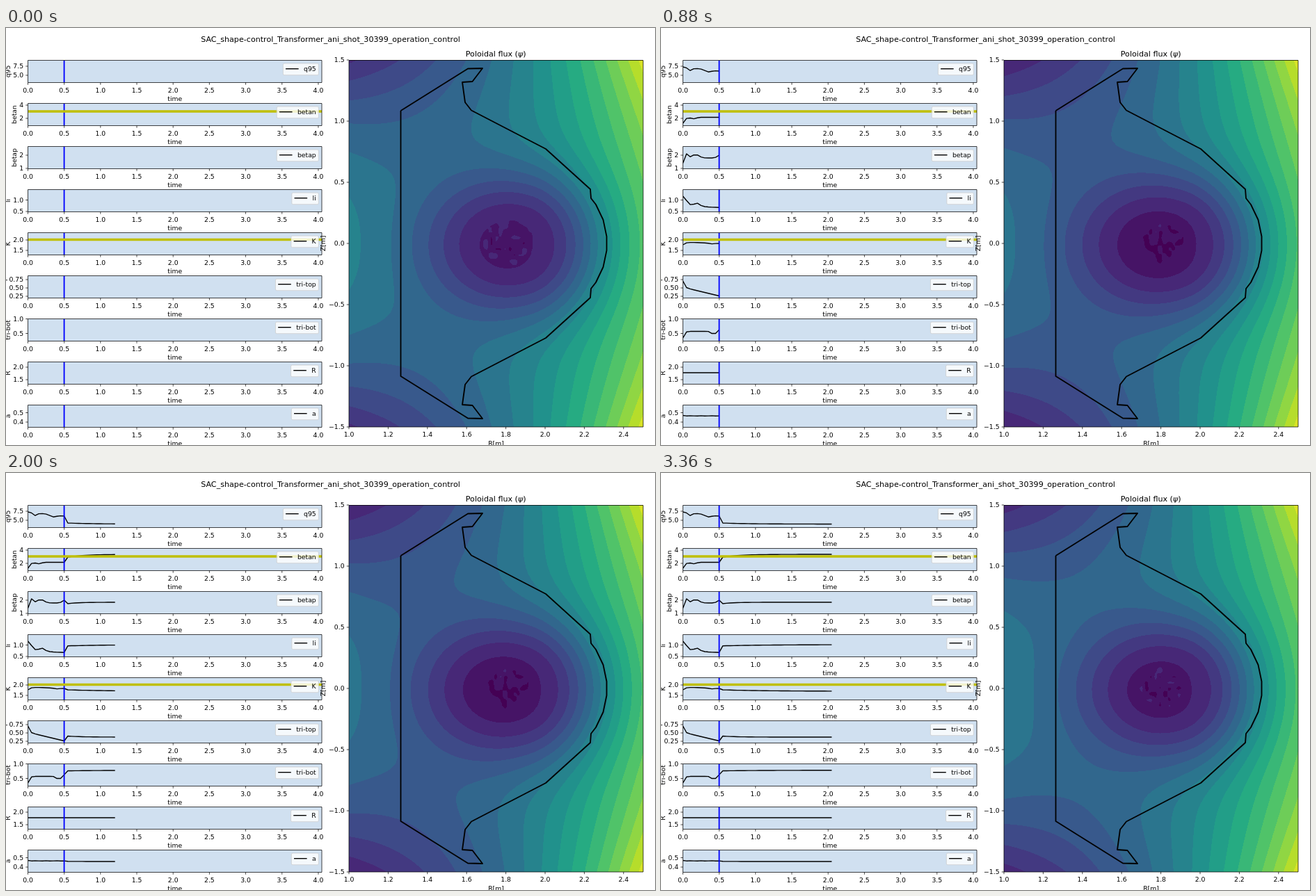
These frames come from a looping animation (933x600 px, 3.44 s). An HTML page with a canvas:

```html
<!DOCTYPE html>
<html lang="en">
<head>
<meta charset="utf-8">
<title>Shape control</title>
<style>
  html, body { margin: 0; width: 100%; height: 100%; overflow: hidden; background: #fff; }
  canvas { display: block; }
</style>
</head>
<body>
<canvas id="stage" width="933" height="600"></canvas>
<script>
const ctx = document.getElementById('stage').getContext('2d');
const STEP = 80, STEPS = 43, PT = 0.92;
const FONT = 9.28, TITLE = 11.14;
const LEFT = { x: 31.5, w: 422.5, h: 32 };
const MAP = { x: 493, y: 46, w: 423, h: 528 };
const MID = 310;

const lerp = (a, b, f) => a + (b - a) * f;
const clamp = (v, a, b) => Math.min(b, Math.max(a, v));
const fade = (k, rate) => Math.exp(-k / rate);
const bump = (k, at, width) => Math.exp(-(((k - at) / width) ** 2));

// Traces in stage y: "early" until the control starts, then "late" by steps since.
const PANELS = [
  { name: 'q95', ticks: ['7.5', '5.0'], y: 55, gap: 13,
    early: k => 56 + 0.6 * k + 4 * bump(k, 2, 0.8) + 3 * bump(k, 7, 1.2),
    late: k => 73.5 - 1.5 * fade(k, 8) },
  { name: 'betan', ticks: ['4', '2'], y: 111, gap: 19, goal: 120,
    early: k => 128.5 + 8.5 * fade(k, 0.6) + 2 * bump(k, 3, 1),
    late: k => 117 + 4 * fade(k, 5) },
  { name: 'betap', ticks: ['2', '1'], y: 183, gap: 19,
    early: k => 187 + 8 * fade(k, 0.4) - 6.5 * bump(k, 1, 0.6) - 5 * bump(k, 3.5, 1.3) - 4 * bump(k, 10, 0.8),
    late: k => 186 + 2 * fade(k, 3) },
  { name: 'li', ticks: ['1.0', '0.5'], y: 247.5, gap: 16.5,
    early: k => 258.5 - 16.5 * fade(k, 2.5) + 3 * bump(k, 2, 0.9) - 3 * bump(k, 4, 0.9),
    late: k => 247 + 1.7 * fade(k, 12) },
  { name: 'K', ticks: ['2.0', '1.5'], y: 305, gap: 15, goal: 304.5,
    early: k => 308 + 4 * fade(k, 0.7) + 0.2 * k + bump(k, 8, 1),
    late: k => 314 - 2 * fade(k, 12) },
  { name: 'tri-top', ticks: ['0.75', '0.50', '0.25'], y: 362, gap: 12,
    early: k => 373 + 1.25 * k - 9 * fade(k, 0.4),
    late: k => 380 - 1.5 * fade(k, 4) },
  { name: 'tri-bot', ticks: ['1.0', '0.5'], y: 418.5, gap: 21,
    early: k => 436.5 + 9.5 * fade(k, 0.4) + 4.5 * bump(k, 8.5, 0.8) - 2.5 * bump(k, 10, 0.5),
    late: k => 427.6 + 0.9 * fade(k, 15) },
  { name: 'R', ticks: ['2.0', '1.5'], y: 488, gap: 18,
    early: () => 496, late: () => 496 },
  { name: 'a', ticks: ['0.5', '0.4'], y: 553.5, gap: 13.5,
    early: k => 558.1 - 0.6 * fade(k, 0.6) + 0.25 * Math.sin(2.2 * k),
    late: k => 559 - 0.2 * fade(k, 4) }
];
const CONTROL = 11;
const trace = (p, k) => k < CONTROL ? p.early(k) : p.late(k - CONTROL);

// Upper half of the vessel wall; the lower half mirrors it.
const WALL = [[567.5, 119], [664, 58.5], [685, 58], [670.5, 77], [656, 78], [660, 107], [669, 118.5],
  [776, 174], [840, 232], [841, 245], [848, 254], [858.5, 276], [863.5, 300]];

// Flux level at the inner edge, by step.
const LEVELS = [[0, 7.4], [8, 6.2], [16, 6.9], [25, 6.5], [31, 6.9], [36, 7.4], [42, 7]];

function levelAt(k) {
  const i = Math.max(1, LEVELS.findIndex(([step]) => step >= k));
  const [a, u] = LEVELS[i - 1], [b, v] = LEVELS[i];
  return lerp(u, v, (k - a) / (b - a));
}

const VIRIDIS = ['440154', '482475', '414487', '355f8d', '2a788e', '21918c', '22a884', '44bf70', '7ad151', 'bddf26', 'fde725']
  .map(h => [0, 2, 4].map(i => parseInt(h.slice(i, i + 2), 16)));

function viridis(v) {
  const p = v * 10, i = Math.min(9, Math.floor(p));
  return VIRIDIS[i].map((c, n) => Math.round(lerp(c, VIRIDIS[i + 1][n], p - i)));
}
const TOP_BAND = 18;
const BANDS = Array.from({ length: TOP_BAND + 1 }, (_, i) => viridis(i / TOP_BAND));

const GRID = 64, ROW = GRID + 1;
let seed = 11;
const random = () => (seed = (seed * 16807) % 2147483647) / 2147483647;
const rough = Array.from({ length: ROW * ROW }, () => random() * 2 - 1);

// t runs 0..1 from the inner to the outer edge, z is the height.
function makeFlux(level) {
  const low = 7.4 - level, corner = 1.8 - 0.75 * low, wide = 1 + 0.05 * low;
  const middle = t => level - 6.4 * t + (19.1 - level) * t * t;
  const edge = t => corner + 6.6 * t + 0.6 * t * t + (9.3 - corner) * t ** 3;
  const depth = middle(0.54) - 0.4 + 0.45 * low;
  return (t, z, noise) => {
    const dx = (t - 0.62) / ((t < 0.62 ? 0.348 : 0.255) * wide), dz = (z + 0.01) / 0.6;
    const well = depth * Math.exp(-((dx * dx + dz * dz) ** 1.3));
    const core = Math.hypot((t - 0.54) / 0.075, z / 0.16) < 1 ? noise : 0;
    return lerp(middle(t), edge(t), z * z / 2.25) - well + core;
  };
}

const mapCanvas = document.createElement('canvas');
mapCanvas.width = MAP.w;
mapCanvas.height = MAP.h;
const mapCtx = mapCanvas.getContext('2d');
const image = mapCtx.createImageData(MAP.w, MAP.h);
const field = new Float32Array(ROW * ROW);

function paintMap(k) {
  const flux = makeFlux(levelAt(k));
  for (let n = 0; n < field.length; n++)
    field[n] = flux(n % ROW / GRID, 1.5 - 3 * Math.floor(n / ROW) / GRID, rough[n]);
  for (let y = 0, p = 0; y < MAP.h; y++) {
    const gy = (y + 0.5) / MAP.h * GRID, j = Math.floor(gy);
    for (let x = 0; x < MAP.w; x++, p += 4) {
      const gx = (x + 0.5) / MAP.w * GRID, i = Math.floor(gx), n = j * ROW + i;
      const u = lerp(lerp(field[n], field[n + 1], gx - i), lerp(field[n + ROW], field[n + ROW + 1], gx - i), gy - j);
      image.data.set(BANDS[clamp(Math.floor(u) + 1, 0, TOP_BAND)], p);
      image.data[p + 3] = 255;
    }
  }
  mapCtx.putImageData(image, 0, 0);
  ctx.drawImage(mapCanvas, MAP.x, MAP.y);
}

function setFont(size = FONT, style = '') {
  ctx.font = `${style} ${size}px "DejaVu Sans", sans-serif`;
}

function text(str, x, y, align = 'center', size = FONT, style = '') {
  setFont(size, style);
  ctx.textAlign = align;
  ctx.fillStyle = '#000';
  ctx.fillText(str, x, y);
  return ctx.measureText(str).width;
}

function upright(str, x, y) {
  ctx.save();
  ctx.translate(x, y);
  ctx.rotate(-Math.PI / 2);
  text(str, 0, 0);
  ctx.restore();
}

function line(points, color = '#000', width = 1.5 * PT) {
  ctx.beginPath();
  points.forEach(([x, y]) => ctx.lineTo(x, y));
  ctx.strokeStyle = color;
  ctx.lineWidth = width;
  ctx.stroke();
}

function tickX(label, x, y) {
  line([[x, y], [x, y + 3.2]], '#000', 0.8 * PT);
  text(label, x, y + 14.3);
}

function tickY(label, x, y) {
  line([[x, y], [x - 3.2, y]], '#000', 0.8 * PT);
  return text(label, x - 6.4, y + 3.4, 'right');
}

function frame(x, y, w, h) {
  ctx.strokeStyle = '#000';
  ctx.lineWidth = 0.8 * PT;
  ctx.strokeRect(x, y, w, h);
}

function legend(name, top) {
  setFont();
  const w = 33.4 + ctx.measureText(name).width, x = 449.4 - w, y = top + 4.6;
  ctx.beginPath();
  ctx.roundRect(x, y, w, 16.6, 1.8);
  ctx.fillStyle = 'rgba(255,255,255,.8)';
  ctx.fill();
  ctx.strokeStyle = 'rgba(204,204,204,.8)';
  ctx.lineWidth = PT;
  ctx.stroke();
  line([[x + 3.7, y + 7.6], [x + 22.3, y + 7.6]]);
  text(name, x + 29.7, y + 11, 'left');
}

function drawPanel(panel, index, k) {
  const { x, w, h } = LEFT, top = 46.5 + index * 62, bottom = top + h;
  ctx.fillStyle = '#d0e0f0';
  ctx.fillRect(x, top, w, h);
  for (let i = 0; i <= 8; i++) tickX((i / 2).toFixed(1), x + i * 52.18, bottom);
  text('time', x + w / 2, bottom + 26.5);
  const widths = panel.ticks.map((label, i) => tickY(label, x, panel.y + i * panel.gap));
  upright(panel.name, 20.6 - Math.max(...widths), top + h / 2);

  ctx.save();
  ctx.beginPath();
  ctx.rect(x, top, w, h);
  ctx.clip();
  if (k > 1) line(Array.from({ length: k }, (_, i) => [x + i * 5.218, trace(panel, i)]));
  line([[83.6, top], [83.6, bottom]], '#00f', 2 * PT);
  if (panel.goal) line([[x, panel.goal], [x + w, panel.goal]], '#bfbf00', 4 * PT);
  ctx.restore();
  frame(x, top, w, h);
  legend(panel.name, top);
}

function drawMap(k) {
  paintMap(k);
  const lower = WALL.map(([x, y]) => [x, 2 * MID - y]).reverse();
  line([...WALL, ...lower, WALL[0]], '#000', 2 * PT);
  frame(MAP.x, 46.5, MAP.w, 527.5);
  for (let i = 0; i <= 7; i++) tickX((1 + i / 5).toFixed(1), MAP.x + i * 56.4, 574);
  for (let i = -3; i <= 3; i++)
    tickY((i < 0 ? '\u2212' : '') + Math.abs(i / 2).toFixed(1), MAP.x, MID - i * 88);
  text('R[m]', 704.5, 600.8);
  upright('Z[m]', 458.5, MID);

  let x = 660.8;
  for (const [part, style] of [['Poloidal flux (', ''], ['ψ', 'italic'], [')', '']])
    x += text(part, x, 41, 'left', TITLE, style);
}

function draw(k) {
  ctx.fillStyle = '#fff';
  ctx.fillRect(0, 0, 933, 600);
  ctx.lineJoin = 'round';
  text('SAC_shape-control_Transformer_ani_shot_30399_operation_control', 466.5, 20, 'center', TITLE);
  PANELS.forEach((panel, i) => drawPanel(panel, i, k));
  drawMap(k);
}

let shown = -1;
const start = performance.now();
function tick() {
  const k = Math.floor((performance.now() - start) / STEP) % STEPS;
  if (k !== shown) draw(shown = k);
  requestAnimationFrame(tick);
}
tick();
</script>
</body>
</html>
```
